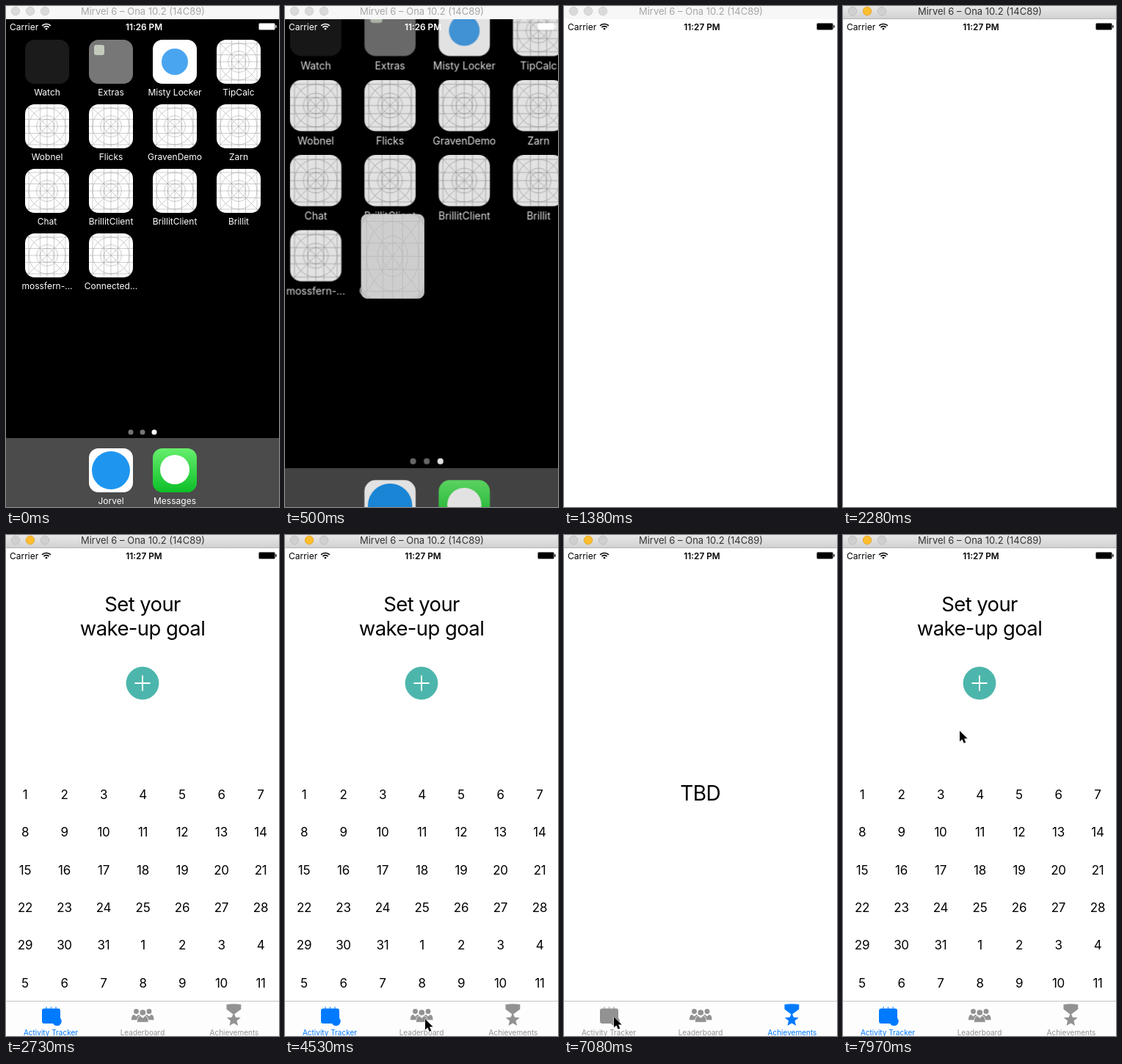
Write an HTML page that moves like this. It is 372 by 683 pixels and loops after 8000 ms.

```html
<!DOCTYPE html>
<html lang="en">
<head>
<meta charset="utf-8">
<title>Wake-up goal app</title>
<style>
  html, body { margin: 0; width: 100%; height: 100%; overflow: hidden; background: #000; }
  svg { display: block; width: 372px; height: 683px; font-family: Inter, Roboto, sans-serif; }
  text { white-space: pre; }
</style>
</head>
<body>
<svg id="stage" viewBox="0 0 372 683" xmlns="http://www.w3.org/2000/svg"></svg>
<script>
const LOOP = 8000;
const BLUE = '#007aff', GREY = '#929292';
const stage = document.getElementById('stage');

const text = (x, y, size, str, extra = '') =>
  `<text x="${x}" y="${y}" font-size="${size}" text-anchor="middle" ${extra}>${str}</text>`;
const rect = (x, y, w, h, fill, r = 0, extra = '') =>
  `<rect x="${x}" y="${y}" width="${w}" height="${h}" rx="${r}" fill="${fill}" ${extra}/>`;
const circle = (x, y, r, fill, extra = '') =>
  `<circle cx="${x}" cy="${y}" r="${r}" fill="${fill}" ${extra}/>`;
const group = (id, body, extra = '') => `<g id="${id}" ${extra}>${body}</g>`;

// Blank app icon: construction lines on a 60 px tile
function gridIcon() {
  const lines = [5, 20.5, 30, 39.5, 55].map(p => `M${p} 0V60M0 ${p}H60`).join('');
  const rings = [25, 14.5, 9.5].map(r => circle(30, 30, r, 'none')).join('');
  return rect(0, 0, 60, 60, '#fff', 13) +
    `<g fill="none" stroke="#999" stroke-width=".5" clip-path="url(#tile)">` +
    `<path d="${lines}M0 0L60 60M60 0L0 60"/>${rings}</g>`;
}

const tiles = {
  grid: '<use href="#grid"/>',
  dark: rect(0, 0, 60, 60, '#1b1b1b', 13),
  folder: rect(0, 0, 60, 60, '#777', 13) + rect(7, 7, 14, 14, '#c3cbbd', 3),
  sky: rect(0, 0, 60, 60, '#fff', 13) + circle(30, 30, 18, '#4aa5f0'),
  compass: rect(0, 0, 60, 60, '#fff', 13) + circle(30, 30, 26, '#1e96f0'),
  chat: rect(0, 0, 60, 60, 'url(#green)', 13) + circle(30, 29, 20, '#fff'),
};

const app = (x, y, label, kind = 'grid') =>
  `<g transform="translate(${x} ${y})">${tiles[kind]}${text(30, 76, 12, label, 'fill="#fff"')}</g>`;

function homeScreen() {
  const apps = [
    ['Watch', 'dark'], ['Extras', 'folder'], ['Misty Locker', 'sky'], ['TipCalc'],
    ['Wobnel'], ['Flicks'], ['GravenDemo'], ['Zarn'],
    ['Chat'], ['BrillitClient'], ['BrillitClient'], ['Brillit'],
    ['mossfern-...'], ['Connected...'],
  ];
  const icons = apps.map(([label, kind], i) =>
    app(26 + 87 * (i % 4), 46 + 88 * Math.floor(i / 4), label, kind)).join('');
  const dots = [170, 186, 202].map((x, i) => circle(x, 581, 3.5, i < 2 ? '#757575' : '#fff')).join('');
  return icons + dots + rect(0, 589, 372, 94, '#4b4b4b') +
    app(113, 603, 'Jorvel', 'compass') + app(200, 603, 'Messages', 'chat');
}

function statusBar(id, color) {
  const arc = r => {
    const d = r * Math.SQRT1_2;
    return `M${55 - d} ${32.8 - d}A${r} ${r} 0 0 1 ${55 + d} ${32.8 - d}`;
  };
  const body = `<text x="5" y="32.5" font-size="12">Carrier</text>` +
    `<path d="${arc(8.3)}${arc(5.1)}" fill="none" stroke="${color}" stroke-width="1.7"/>` +
    `<path d="${arc(2.6)}L55 32.8Z"/>` +
    text(188, 32.5, 11.8, '11:26 PM', 'class="clock" font-weight="600"') +
    rect(344.5, 23.5, 22, 9, 'none', 1.5, `stroke="${color}" stroke-opacity=".5"`) +
    rect(345, 24, 21, 8, color, .8) + rect(367.2, 26, 1.4, 4, color, .7);
  return group(id, body, `fill="${color}"`);
}

function titleBar() {
  const dots = [13, 33, 53].map(x =>
    circle(x, 7, 5.8, '#dadada', 'class="dot" stroke="#cbcbcb" stroke-width=".8"')).join('');
  return rect(0, 0, 372, 18, '#f7f7f7', 0, 'id="titleBg"') +
    rect(0, 17, 372, 1, '#b4b4b4', 0, 'id="titleLine"') + dots +
    text(186.5, 12, 13, 'Mirvel 6 – Ona 10.2 (14C89)', 'id="title"');
}

function goalScreen() {
  const heading = 'letter-spacing="-.6"';
  let out = text(186, 104, 27.5, 'Set your', heading) + text(186, 137, 27.5, 'wake-up goal', heading) +
    circle(186, 202, 22.4, '#4db6ac') +
    '<path d="M175.5 202H196.5M186 191.5V212.5" stroke="#fff" stroke-width="1.8"/>';
  for (let i = 0; i < 42; i++) {
    out += text(26 + 53.5 * (i % 7), 360 + 51.3 * Math.floor(i / 7), 17, i % 31 + 1, 'letter-spacing="-.3"');
  }
  return out;
}

function tabBar() {
  const calendar = rect(49, 645.5, 25, 20.5, 'currentColor', 3) +
    '<path d="M55 643V647M61.5 643V647M68 643V647" stroke="currentColor" stroke-width="1.6" stroke-opacity=".6"/>' +
    circle(69.5, 663, 6.2, 'currentColor');
  const person = (x, y, k) => `<g transform="translate(${x} ${y}) scale(${k})">` +
    circle(0, 0, 4.2, 'currentColor') +
    '<path d="M-8.5 14.5Q-8.5 5.5 -3.5 4.8L0 8L3.5 4.8Q8.5 5.5 8.5 14.5Z" fill="currentColor" stroke="#fff" stroke-width=".8"/></g>';
  const people = person(177.5, 649.5, .82) + person(195, 649.5, .82) + person(186.3, 651, .92);
  let star = '';
  for (let i = 0; i < 10; i++) {
    const r = i % 2 ? 4.4 : 10, a = i * Math.PI / 5;
    star += `${i ? 'L' : 'M'}${310.3 + r * Math.sin(a)} ${661 - r * Math.cos(a)}`;
  }
  const medal = `<path d="M300.5 640Q310.5 638.6 320.3 640V646.5L311.5 653H309L300.5 646.5Z${star}Z" fill="currentColor"/>`;
  const tab = (x, label, icon) => `<g class="tab">${icon}${text(x, 682, 10, label, 'fill="currentColor"')}</g>`;
  return rect(0, 635, 372, 48, '#fdfdfd') + rect(0, 635, 372, 1, '#c4c4c4') +
    tab(61, 'Activity Tracker', calendar) + tab(186, 'Leaderboard', people) + tab(311, 'Achievements', medal);
}

stage.innerHTML =
  `<defs>
    <clipPath id="tile"><rect width="60" height="60" rx="13"/></clipPath>
    <linearGradient id="green" x2="0" y2="1"><stop stop-color="#67ee6d"/><stop offset="1" stop-color="#0cbf28"/></linearGradient>
    <linearGradient id="chrome" x2="0" y2="1"><stop stop-color="#e8e8e8"/><stop offset="1" stop-color="#d0d0d0"/></linearGradient>
    <g id="grid">${gridIcon()}</g>
  </defs>` +
  rect(0, 0, 372, 683, '#000') +
  group('home', homeScreen()) +
  statusBar('homeStatus', '#fff') +
  group('seed', rect(104, 284, 85.5, 114.5, '#c2c2c2', 8, 'stroke="#b5adb0"') +
    '<use href="#grid" transform="translate(104 284) scale(1.425 1.908)" opacity=".2"/>') +
  group('window', rect(0, 18, 372, 667, '#fff') + statusBar('appStatus', '#000')) +
  group('content', group('goal', goalScreen()) +
    group('tbd', text(185.7, 362, 28, 'TBD', 'letter-spacing="-.6"')) + group('tabs', tabBar())) +
  group('cursor', '<path d="M0 0V14.6L3.4 11.5L5.7 16.8L8.3 15.7L6 10.5H10.6Z" fill="#000" stroke="#fff" stroke-width="1" paint-order="stroke"/>') +
  titleBar();

const el = id => document.getElementById(id);
const set = (node, attrs) => { for (const k in attrs) node.setAttribute(k, attrs[k]); };
const show = (id, on) => set(el(id), { display: on ? 'inline' : 'none' });
const dots = [...document.querySelectorAll('.dot')];
const tabs = [...document.querySelectorAll('.tab')];
const clocks = [...document.querySelectorAll('.clock')];

// Value of the last [time, ...value] entry already reached
const at = (track, t) => track.reduce((last, step) => t >= step[0] ? step : last).slice(1);

const zoomTrack = [[0, 1, 0, 0, 1], [500, 1.163, -23.2, -55, .89], [640, 2.8, -256, -618, .13]];
const fadeTrack = [[0, 0], [2430, .35], [2580, .8], [2730, 1]];
const tabTrack = [[0, 0], [4680, 1], [5880, 2], [7230, 0]];
const cursorTrack = [
  [0, -50, -50], [3630, 7, 291], [3780, 72, 412], [3930, 158, 556], [4080, 219, 640],
  [4380, 203, 651], [4530, 191, 660],
  [5280, 203, 660], [5430, 240, 658], [5580, 278, 657], [5730, 304, 656],
  [6480, 286, 657], [6630, 232, 659], [6780, 165, 659], [6930, 104, 658], [7080, 68, 657],
  [7530, 84, 598], [7680, 118, 462], [7830, 148, 324], [7970, 159, 267],
];

function draw(t) {
  const focused = t >= 2280;
  const [zoom, zx, zy, alpha] = at(zoomTrack, t);
  const [fade] = at(fadeTrack, t);
  const [tab] = at(tabTrack, t);
  const [cx, cy] = at(cursorTrack, t);

  show('home', t < 790);
  show('homeStatus', t < 790);
  show('seed', t >= 500 && t < 640);
  show('window', t >= 640);
  set(el('home'), { transform: `translate(${zx} ${zy}) scale(${zoom})`, opacity: alpha });
  set(el('homeStatus'), { opacity: t < 640 ? 1 : .16 });
  set(el('window'), { transform: t < 790 ? 'translate(7 20) scale(.949 .94)' : '' });
  clocks.forEach(c => c.textContent = t < 1380 ? '11:26 PM' : '11:27 PM');

  set(el('content'), { opacity: fade });
  show('content', fade > 0);
  show('goal', tab === 0);
  show('tbd', tab !== 0);
  tabs.forEach((node, i) => set(node, { color: i === tab ? BLUE : GREY }));
  set(el('cursor'), { transform: `translate(${cx} ${cy})` });

  set(el('titleBg'), { fill: focused ? 'url(#chrome)' : '#f7f7f7' });
  show('titleLine', focused);
  set(el('title'), { fill: focused ? '#333' : '#a6a6a6' });
  dots.forEach((d, i) => set(d, focused
    ? { fill: i === 1 ? '#fdbd2e' : '#d0d0d0', stroke: i === 1 ? '#e0a32a' : '#bcbcbc' }
    : { fill: '#dadada', stroke: '#cbcbcb' }));
}

let start;
function tick(now) {
  start ??= now;
  draw((now - start) % LOOP);
  requestAnimationFrame(tick);
}
draw(0);
requestAnimationFrame(tick);
</script>
</body>
</html>
```
